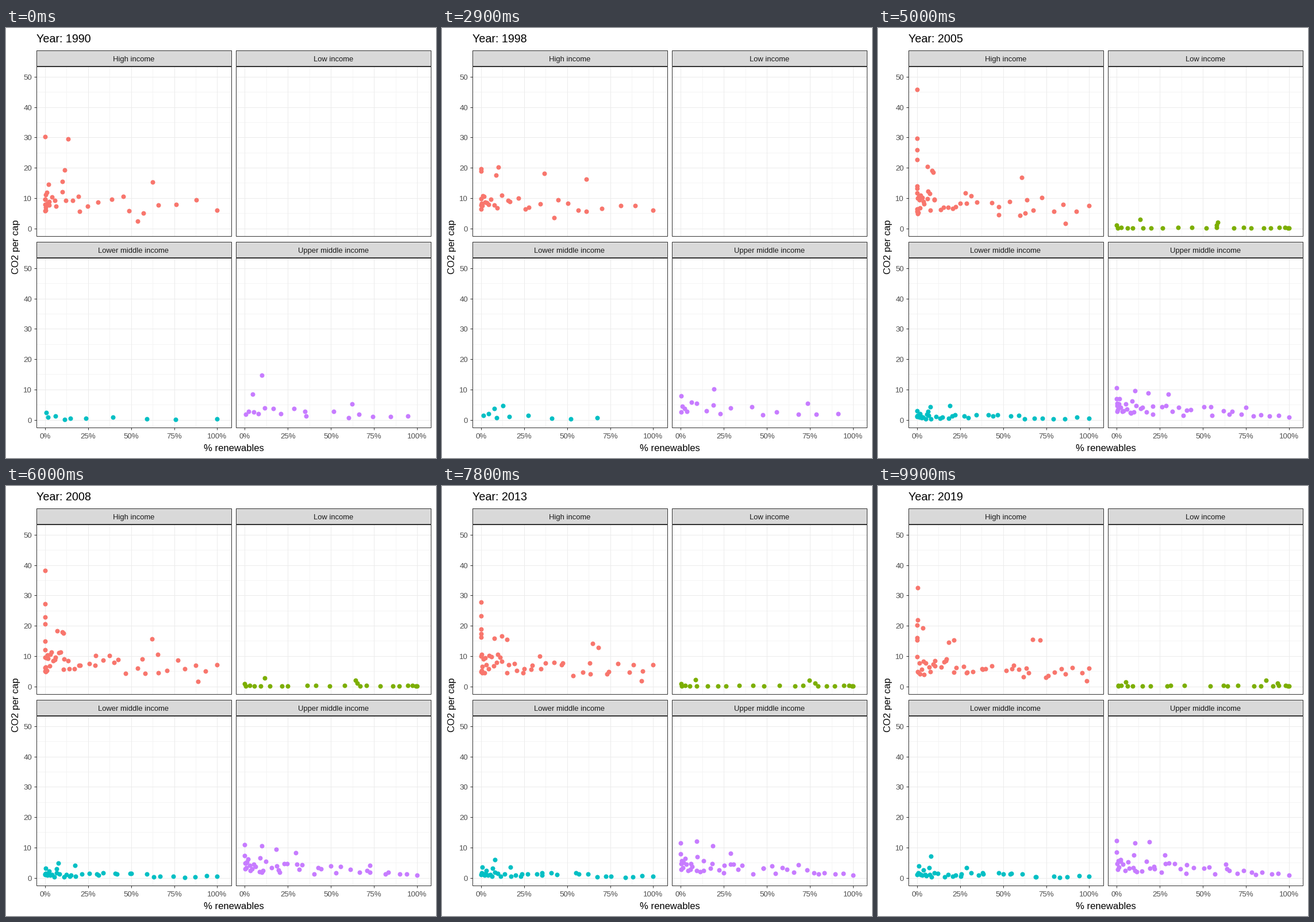
A matplotlib script for the animation above (10000 ms loop, 748 px wide and 748 px high).

```python
import numpy as np
import matplotlib.pyplot as plt
from matplotlib.animation import FuncAnimation
from matplotlib.patches import Rectangle

plt.rcParams["font.family"] = "Liberation Sans"

SIZE, DPI = 748, 100
FRAMES, INTERVAL = 100, 100
FIRST, LAST = 1990, 2019
SWITCH = 34  # more countries report from 2000 on
EARLY, LATE = (1990, 1998.5), (2004.6, 2019)
PX = 72 / DPI  # one pixel in points
INK, GRID, FAINT = "#333333", "#EBEBEB", "#F4F4F4"
rng = np.random.default_rng(4)


def mix(a, b, f):
    return a + (b - a) * f


def along(path, f):
    """Point at fraction f of a path with evenly timed stops."""
    stops = np.linspace(0, 1, len(path))
    return [np.interp(f, stops, axis) for axis in zip(*path)]


def cloud(n, power, low, high, fall, reach=(100, 100), ends=False):
    """Dots crowding towards x = 0, or both ends, that sink by `fall` as x grows.

    The paired arguments give the value at the start and the end of the era.
    """
    u = np.arange(1, n + 1) / n
    if ends:
        u = np.sin(np.pi / 2 * u) ** 2
    level = rng.permutation(n) / max(n - 1, 1)
    hops = rng.normal(size=(LAST - FIRST + 2, 2, n))

    def state(t, f):
        year = int(t)
        dx, dy = mix(hops[year - FIRST], hops[year - FIRST + 1], t - year)
        x = mix(*reach, f) * u ** mix(*power, f)
        x = np.clip(x + 0.001 * dx * x * (100 - x), 0, 100)
        y = mix(mix(*low, f), mix(*high, f), level) * (1 - fall * x / 100)
        return np.column_stack([x, y * np.clip(1 + 0.07 * dy, 0.7, 1.3)])

    return state


def era(span, paths, crowd):
    """Outliers on their own paths plus the crowd, as a function of the year."""
    def state(t):
        f = np.clip((t - span[0]) / (span[1] - span[0]), 0, 1)
        return np.vstack([[along(p, f) for p in paths], crowd(t, f)])
    return state


high_early = era(EARLY, [
    [(0, 30.2), (0, 19.6)],
    [(13.4, 29.5), (36.8, 18.1)],
    [(11.5, 19.3), (10.1, 20.2)],
    [(10, 15.4), (8.6, 17.6)],
    [(2, 14.6), (0, 18.8)],
    [(62.3, 15.2), (61.2, 16.2)],
    [(53.8, 2.3), (42.3, 3.6)],
], cloud(29, (3.6, 3.2), (6, 6.5), (12, 11), 0.3))

high_late = era(LATE, [
    [(0, 46), (0, 27), (0.3, 32.5)],
    [(0, 29.8), (0, 23.5), (0.2, 22)],
    [(0, 25.9), (0, 18.7), (0, 20.2)],
    [(0, 22.7), (0, 17.5), (0, 16.1)],
    [(0, 14), (0, 16.3), (0, 15.3)],
    [(9.3, 18.6), (11, 17), (18.2, 14.6)],
    [(8.6, 19), (14, 15.5), (21.5, 15.2)],
    [(6, 20.5), (8.3, 15.2), (3.4, 19.3)],
    [(60.6, 16.9), (64.3, 14), (67.2, 15.4)],
    [(63.7, 9.3), (71.6, 15.3)],
    [(86.2, 1.6), (98.4, 1.9)],
], cloud(43, (3, 1.9), (5, 4), (13, 9.5), 0.35))

low_late = era(LATE, [
    [(0, 1), (0, 0.9), (1, 0.3)],
    [(13.4, 3), (9, 2.3), (5.2, 1.5)],
    [(58.6, 2.1), (86.8, 2.1)],
    [(57.9, 1.1), (93.2, 1)],
], cloud(20, (1, 1), (0.05, 0.05), (0.3, 0.3), 0, ends=True))

lower_early = era(EARLY, [
    [(0.8, 2.4), (12.7, 4.7)],
    [(11.5, 0.2), (7.7, 3.7)],
], cloud(8, (2, 2), (0.2, 0.4), (1.2, 2), 0.6, (100, 69)))

lower_late = era(LATE, [
    [(0, 3), (1, 4)],
    [(1.8, 2), (3.8, 2.6)],
    [(6.4, 2.8), (7, 3.3)],
    [(7.7, 4.3), (8, 7.2)],
    [(19, 4.6), (15, 3.6), (28.6, 3.4)],
], cloud(34, (2.5, 2), (0.3, 0.3), (1.9, 1.9), 0.4))

upper_early = era(EARLY, [
    [(9.7, 14.7), (19.2, 10.2)],
    [(4.5, 8.4), (0, 7.8)],
    [(62.3, 5.2), (73.5, 5.4)],
], cloud(16, (1.8, 2.3), (1.4, 2.2), (4.6, 6.2), 0.7, (94.5, 91.5)))

upper_late = era(LATE, [
    [(0, 10.5), (0, 12.2)],
    [(0, 7), (0, 8.4)],
    [(8.7, 6.2), (10, 7.6)],
    [(10.6, 9.5), (9, 12.2), (10.4, 11.4)],
    [(18.2, 8.8), (18.8, 11.8)],
    [(29.8, 8.5), (28, 7.6)],
    [(75, 4.1), (63.2, 4.5)],
], cloud(39, (2.2, 1.9), (2, 2), (6.2, 6.2), 0.72))

# name, left, top, colour, dots before 2000, dots from 2000
PANELS = [
    ("High income", 53, 39, "#F8766D", high_early, high_late),
    ("Low income", 400.5, 39, "#7CAE00", None, low_late),
    ("Lower middle income", 53, 372, "#00BFC4", lower_early, lower_late),
    ("Upper middle income", 400.5, 372, "#C77CFF", upper_early, upper_late),
]

fig = plt.figure(figsize=(SIZE / DPI, SIZE / DPI), dpi=DPI, facecolor="white")
ax = fig.add_axes([0, 0, 1, 1])
ax.set_xlim(0, SIZE)
ax.set_ylim(SIZE, 0)
ax.axis("off")


def text(x, y, s, size, color="black", ha="center", **kw):
    return ax.text(x, y, s, fontsize=size * PX, color=color, ha=ha, va="baseline", **kw)


def line(x, y, color, z=1):
    ax.plot(x, y, color=color, lw=PX, zorder=z, solid_capstyle="butt")


def box(x, y, w, h, fill):
    ax.add_patch(Rectangle((x, y), w, h, fc=fill, ec=INK, lw=PX, zorder=4))


def px(left, share):
    return left + 15 + 2.995 * share


def py(top, co2):
    return top + 309.6 - 5.275 * co2


def draw_grid(left, top, right, head, foot):
    for shares, levels, color, z in (
            (np.arange(12.5, 100, 25), range(5, 50, 10), FAINT, 1),
            (range(0, 101, 25), range(0, 51, 10), GRID, 2)):
        for v in shares:
            line([px(left, v)] * 2, [head, foot], color, z)
        for v in levels:
            line([left, right], [py(top, v)] * 2, color, z)


def draw_panel(name, left, top):
    right, head, foot = left + 339, top + 28, top + 322.6
    draw_grid(left, top, right, head, foot)
    box(left, head, right - left, foot - head, "none")
    box(left, top + 0.4, right - left, 26.2, "#D9D9D9")
    text(left + 169, top + 18.7, name, 13, "#1A1A1A", zorder=5)
    if left < 100:
        for v in range(0, 51, 10):
            y = py(top, v)
            line([left - 4, left], [y, y], INK)
            text(left - 8, y + 5, str(v), 13.2, "#4D4D4D", "right")
    if top > 100:
        for v in range(0, 101, 25):
            x = px(left, v)
            line([x, x], [foot, foot + 4], INK)
            text(x, 713.6, f"{v}%", 13.2, "#4D4D4D")


dots = []
for name, left, top, color, *_ in PANELS:
    draw_panel(name, left, top)
    dots.append(ax.scatter([], [], s=(8 * PX) ** 2, c=color, lw=0, zorder=3))

title = text(53, 25, "", 19.8, ha="left")
text(396, 735.8, "% renewables", 16.6)
text(22.5, 380.5, "CO2 per cap", 16.6, rotation=90, rotation_mode="anchor")


def update(k):
    t = mix(FIRST, LAST, k / (FRAMES - 1))
    title.set_text(f"Year: {round(t)}")
    for dot, (_, left, top, _, before, after) in zip(dots, PANELS):
        state = before if k < SWITCH else after
        p = state(t) if state else np.empty((0, 2))
        dot.set_offsets(np.column_stack([px(left, p[:, 0]), py(top, p[:, 1])]))
    return [title, *dots]


anim = FuncAnimation(fig, update, frames=FRAMES, interval=INTERVAL, repeat=True, repeat_delay=0)
plt.show()
```
